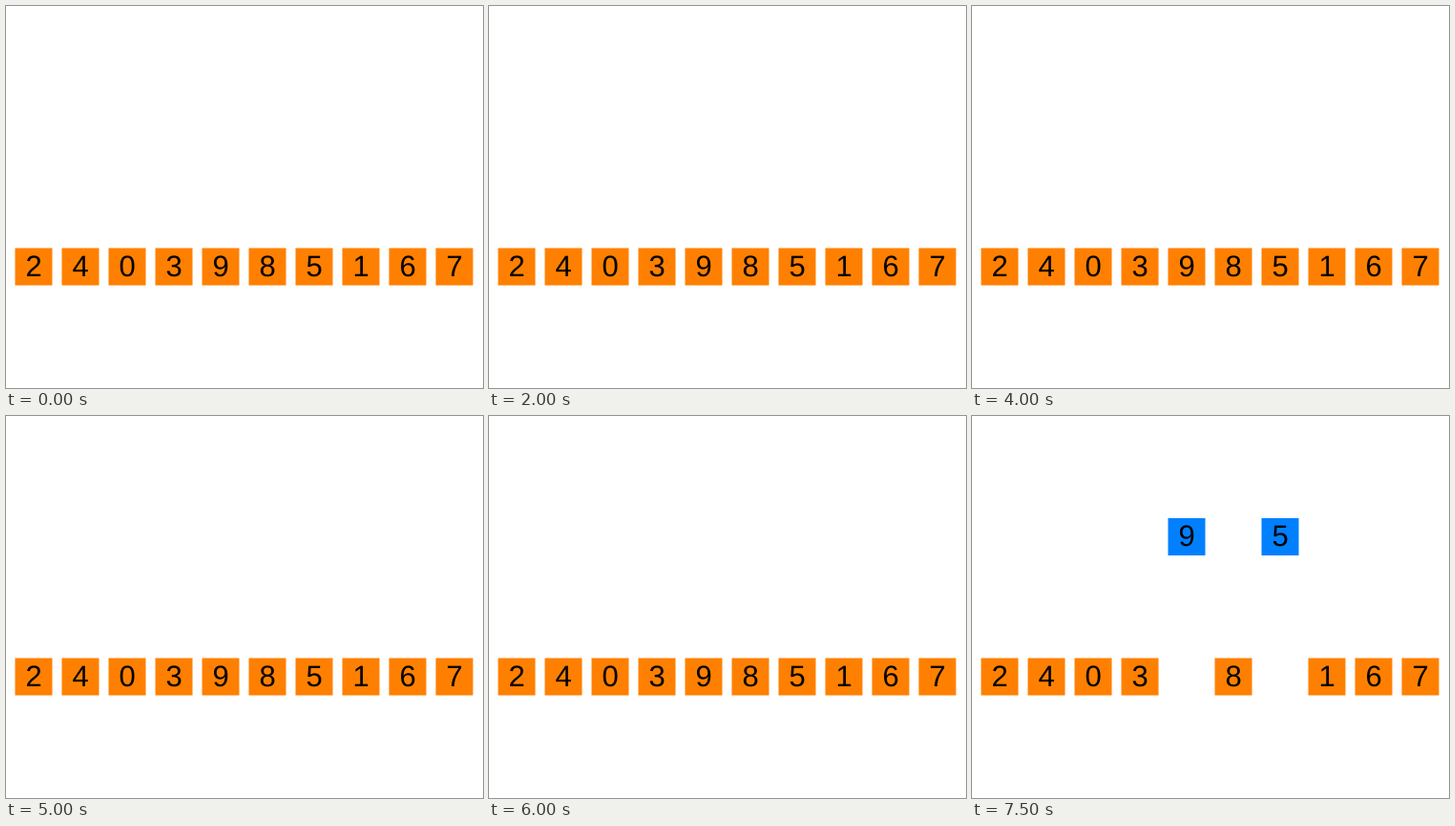
These frames come from a looping animation (500 by 400 pixels, 8 s). An HTML page:

```html
<!DOCTYPE html>
<html lang="en">
<head>
<meta charset="utf-8">
<title>Quicksort partition</title>
<style>
  html, body { margin: 0; width: 100%; height: 100%; overflow: hidden; background: #fff; }
  svg { display: block; width: 500px; height: 400px; }
  rect { fill: #ff8000; }
  .up rect { fill: #0080ff; }
  .up { transform: translateY(-146.5px); }
  text {
    font: 31px "Liberation Sans", Arial, sans-serif;
    text-anchor: middle;
    text-rendering: geometricPrecision;
    fill: #000;
  }
</style>
</head>
<body>
<svg viewBox="0 0 500 400"></svg>
<script>
const NS = "http://www.w3.org/2000/svg";
const values = [2, 4, 0, 3, 9, 8, 5, 1, 6, 7];
const STEP = 500, LOOP = 8000;
const LEFT = 9.5, TOP = 253.5, SIZE = 39, PITCH = 49;

function add(parent, tag, attrs = {}) {
  const el = document.createElementNS(NS, tag);
  for (const key in attrs) el.setAttribute(key, attrs[key]);
  return parent.appendChild(el);
}

const svg = document.querySelector("svg");
const tiles = values.map((value, i) => {
  const x = LEFT + PITCH * i;
  const tile = add(svg, "g");
  add(tile, "rect", { x, y: TOP, width: SIZE, height: SIZE });
  add(tile, "text", { x: x + SIZE / 2, y: TOP + 29 }).textContent = value;
  return tile;
});

// Compare each value with the last one until a smaller one follows a larger one, then pick the swap.
const pivot = values.length - 1;
const pairs = [];
let store = 0;
for (let i = 0; i < pivot; i++) {
  pairs.push([i, pivot]);
  if (values[i] < values[pivot]) {
    if (i !== store) {
      pairs.push([store, i]);
      break;
    }
    store++;
  }
}

function draw(now) {
  const step = Math.floor((now % LOOP) / STEP);
  const raised = step % 2 ? pairs[(step - 1) / 2] : [];
  tiles.forEach((tile, i) => tile.classList.toggle("up", raised.includes(i)));
}

const start = performance.now();
function tick() {
  draw(performance.now() - start);
  requestAnimationFrame(tick);
}
tick();
</script>
</body>
</html>
```
